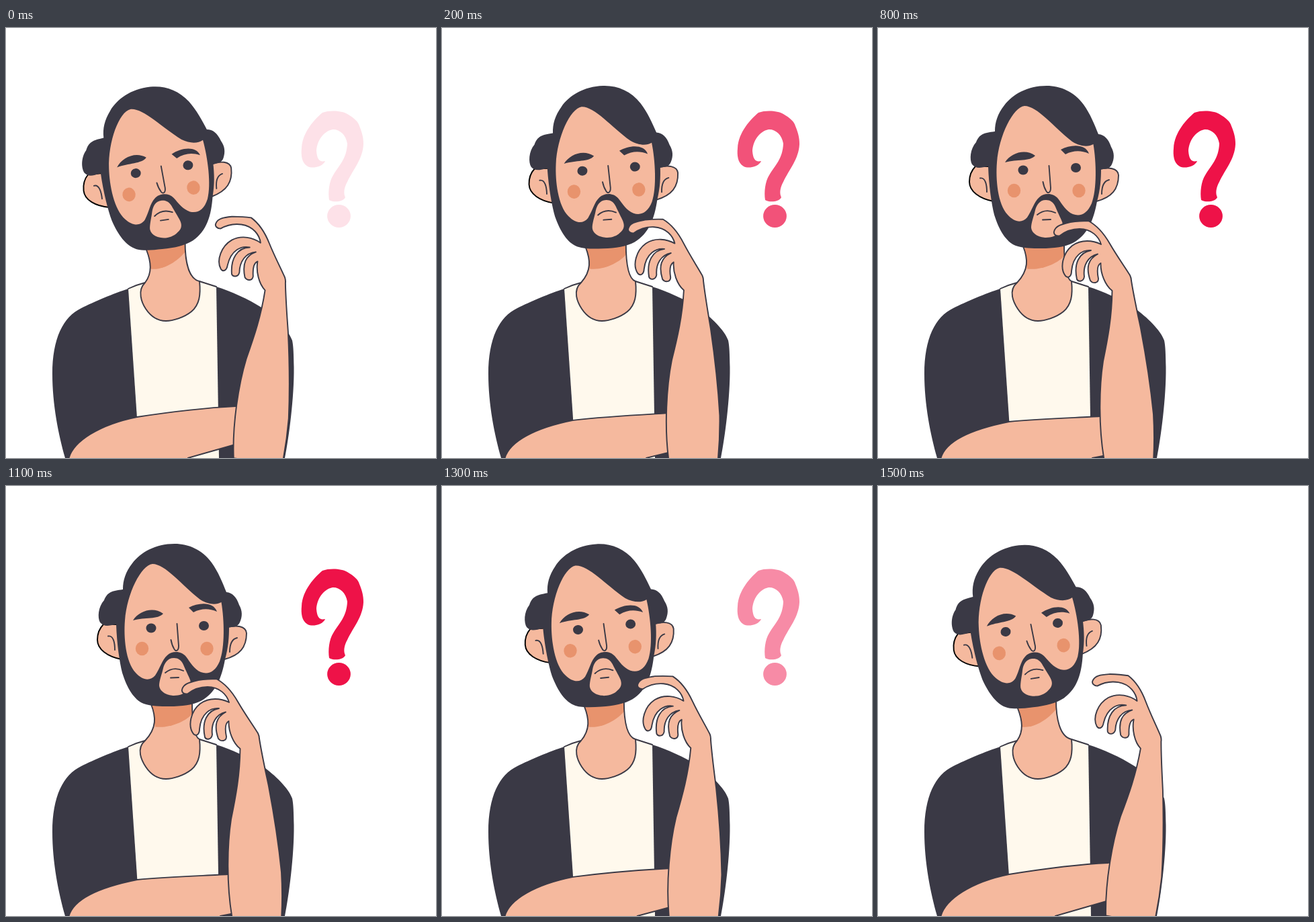
Recreate the animation shown at these times as an HTML page with a canvas. Size 640x640 px, loop 1600 ms.

```html
<!DOCTYPE html>
<html lang="en">
<head>
<meta charset="utf-8">
<title>Thinking man</title>
<style>
  html, body { margin: 0; width: 100%; height: 100%; overflow: hidden; background: #fff; }
  canvas { display: block; width: 640px; height: 640px; }
</style>
</head>
<body>
<canvas id="stage" width="640" height="640"></canvas>
<script>
const ctx = document.getElementById('stage').getContext('2d');

const DARK = '#3a3945', SKIN = '#f5b99e', BLUSH = '#e8936d', CREAM = '#fff9ed', RED = '#ee1248';

const LOOP = 1600, STEP = 100;
// Share of the way from "hand away" (0) to "hand on chin" (1).
const RISE = [0.125, 0.365, 0.73, 0.94];
const FALL = [0.84, 0.485, 0.13, 0];

const HEAD = { x: 248, y: 427, turn: -0.122 };
const ARM = { x: 372, y: 655, turn: 0.16 };
const BROW_LIFT = 9;

const jacket = new Path2D(`M182 388 C160 395 130 408 112 417 C85 430 69 462 69 515
  C69 560 78 605 88 640 L415 640 C421 610 429 550 428.5 505 C428 485 428 475 426 465
  C421 450 400 430 382 417 C360 403 335 392 313 385 Z`);
const shirt = new Path2D('M182 388 L207 379 L288 377 L313 385 L317 640 L199 640 Z');
const shirtTop = new Path2D('M182 388 Q195 382 207 379 M288 377 L313 385');

const leftEar = new Path2D('M145 206 C138 213 136 222 136 229 C136 243 151 254 172 258 L180 206 Z');
const rightEar = new Path2D('M331 210 C342 207 357 208 358 219 C358 240 348 252 325 258 L320 215 Z');
const earFolds = new Path2D('M152 223.5 C160 222 162 234 162 244 M344 226 C335 228 333 237 333 247');
const hair = new Path2D(`M174 154 C157 156 151 158 146 170 C137 180 136 196 140 203
  C146 210 152 208 164 206 C165 235 169 262 173 278 C180 300 190 318 205 324
  C216 328 230 328 243 328 C262 328 278 326 290 320 C312 308 321 286 326 258
  C331 240 332 225 332 210 C338 210 345 210 348 203 C352 194 352 186 347 177
  C343 165 337 159 328 158 C322 143 316 128 306 114 C292 95 272 86 251 86
  C222 86 200 99 188 115 C178 128 174 140 174 154 Z`);
const face = new Path2D(`M177 200 C180 160 201 118 218 116 C237 116 261 147 289 169
  C302 177 313 177 320.5 173 C325 200 326 240 318 261 C311 277 301 281 290 277
  C280 273 274 262 268 254 C261 245 247 245 240 252 C232 259 230 270 222 282
  C214 291 203 289 193 278 C178 262 175 225 177 200 Z`);
const mouthPatch = new Path2D(`M250 256 C240 256 236 264 234 271 C232 280 228 290 228 297
  C229 308 243 312 250 312 C258 312 265 309 268 306 C277 300 276 293 273 286
  C270 279 266 271 264 266 C261 259 256 256 250 256 Z`);
const leftBrow = new Path2D('M189 200 C198 186 219 179 234 190 C226 199 207 195 189 200 Z');
const rightBrow = new Path2D('M272 181 C287 173 309 172 314 187 C302 182 291 182 279 188 Z');
const faceLines = new Path2D(`M254.5 205 L257 238 C257 246 252 247 250 242 Q247 237 245.5 229
  M237 278 Q249 268 264 275 M245 285.5 L257 285`);

const arm = new Path2D(`M337 645 C328 595 329 535 335 496 C342 462 348 430 348.5 391
  C338 383 331 365 331.5 350 C326 353 326 363 328 373 C328 380 320 381 316 376
  C309 356 313 344 327 336.5 C312 340 305 354 307 370 C306 378 298 378 296 374
  C291 351 299 334 317 331 C305 330 290 338 288 362 C288 370 283 373 279 369
  C270 357 275 335 289 324 C303 314 320 316 332 322 C329 311 318 299 300 299
  C286 299 277 304 270 309.5 C265 310 261 307 262 303 C264 294 274 292 286 289
  Q301 287 313 287 C328 295 337 307 345 321 C356 340 367 355 375 368 Q377 372 377 376
  C381 401 387 428 391 447 C399 489 406 535 410 575 Q412 610 410 645 Z`);

const question = new Path2D(`M474 200 C468 208 455 209 449 206 C440 201 439 189 440 179
  C441 155 460 135 471 126 C482 122 500 123 508 128 C518 134 524 139 526 146
  C530 156 532 163 532 173 C531 195 517 210 508 229 C503 238 502 246 505 252
  C502 259 487 260 481 256 C479 245 481 228 487 219 C496 204 507 195 508 172
  C506 158 495 150 486 151 C472 154 463 168 462 183 C463 196 467 200 475 198 Z`);

const mix = (from, to, p) => from + (to - from) * p;

function fill(path, color) {
  ctx.fillStyle = color;
  ctx.fill(path);
}

function line(path, color = DARK, width = 1.9) {
  ctx.strokeStyle = color;
  ctx.lineWidth = width;
  ctx.stroke(path);
}

function oval(x, y, rx, ry, color) {
  const path = new Path2D();
  path.ellipse(x, y, rx, ry, 0, 0, Math.PI * 2);
  fill(path, color);
}

function turned(joint, p, draw) {
  ctx.save();
  ctx.translate(joint.x, joint.y);
  ctx.rotate(joint.turn * (1 - p));
  ctx.translate(-joint.x, -joint.y);
  draw();
  ctx.restore();
}

function drawNeck(p) {
  const left = mix(208, 216, p), leftY = mix(331, 325, p);
  const right = mix(265, 277, p), rightY = mix(318, 321, p);
  const collar = mix(195, 193, p);
  const neck = new Path2D(`M${left} ${leftY} C${left + 7} ${leftY + 18} ${left + 9} ${mix(365, 360, p)} 207 379
    C${collar} 391 202 409 208 418 C216 430 227 436 238 436 C248 436 265 431 276 422
    C288 412 290 397 288 377 C${mix(270, 279, p)} 373 ${right} 345 ${right} ${rightY}`);
  fill(neck, SKIN);
  ctx.save();
  ctx.clip(neck);
  const shadeY = mix(331, 338, p);
  fill(new Path2D(`M${left - 4} ${leftY - 9} L${left + 6} 358.5
    C${left + 28} 361 ${right - 8} ${shadeY + 12} ${right + 1} ${shadeY} L${right + 1} 310 Z`), BLUSH);
  ctx.restore();
  line(neck);
}

function drawHead(p) {
  fill(leftEar, SKIN);
  line(leftEar, '#000');
  fill(rightEar, SKIN);
  line(rightEar);
  line(earFolds);
  fill(hair, DARK);
  fill(face, SKIN);
  fill(mouthPatch, SKIN);
  oval(202.5, 242, 9.7, 10.3, BLUSH);
  oval(299, 242, 9.7, 10.3, BLUSH);
  oval(216, 211.5, 7.5, 7, DARK);
  oval(294.5, 208, 7.5, 7, DARK);
  line(faceLines);
  fill(leftBrow, DARK);
  ctx.translate(0, BROW_LIFT * (1 - p));
  fill(rightBrow, DARK);
}

function drawFoldedArm(p) {
  const wrist = mix(343, 330, p), top = mix(561, 578, p), bend = mix(578, 586, p);
  const under = mix(264, 319, p), end = mix(618, 636, p);
  const upper = `M93 642 C99 615 140 ${bend + 11} 195 ${bend} C245 ${mix(570, 581, p)} 300 ${top + 2} ${wrist} ${top}`;
  fill(new Path2D(`${upper} L345 ${top} L345 ${end - 1} L340 ${end} L${under} 640 L${under} 642 Z`), SKIN);
  line(new Path2D(`${upper} M${under} 640 Q${mix(under, 340, 0.5)} ${mix(640, end, 0.5)} 340 ${end}`));
}

function drawArm() {
  fill(arm, SKIN);
  line(arm);
}

function drawQuestion(alpha) {
  ctx.globalAlpha = alpha;
  fill(question, RED);
  oval(495.5, 280, 17.4, 17, RED);
  ctx.globalAlpha = 1;
}

function pose(time) {
  const step = Math.floor((time % LOOP) / STEP);
  const fallStart = LOOP / STEP - FALL.length;
  return step >= fallStart ? FALL[step - fallStart] : RISE[step] ?? 1;
}

function draw(p) {
  ctx.fillStyle = '#fff';
  ctx.fillRect(0, 0, 640, 640);
  drawQuestion(p);
  fill(jacket, DARK);
  fill(shirt, CREAM);
  line(shirtTop);
  drawNeck(p);
  turned(HEAD, p, () => drawHead(p));
  drawFoldedArm(p);
  turned(ARM, p, drawArm);
}

ctx.lineJoin = ctx.lineCap = 'round';
const start = performance.now();

function tick() {
  draw(pose(performance.now() - start));
  requestAnimationFrame(tick);
}
tick();
</script>
</body>
</html>
```
